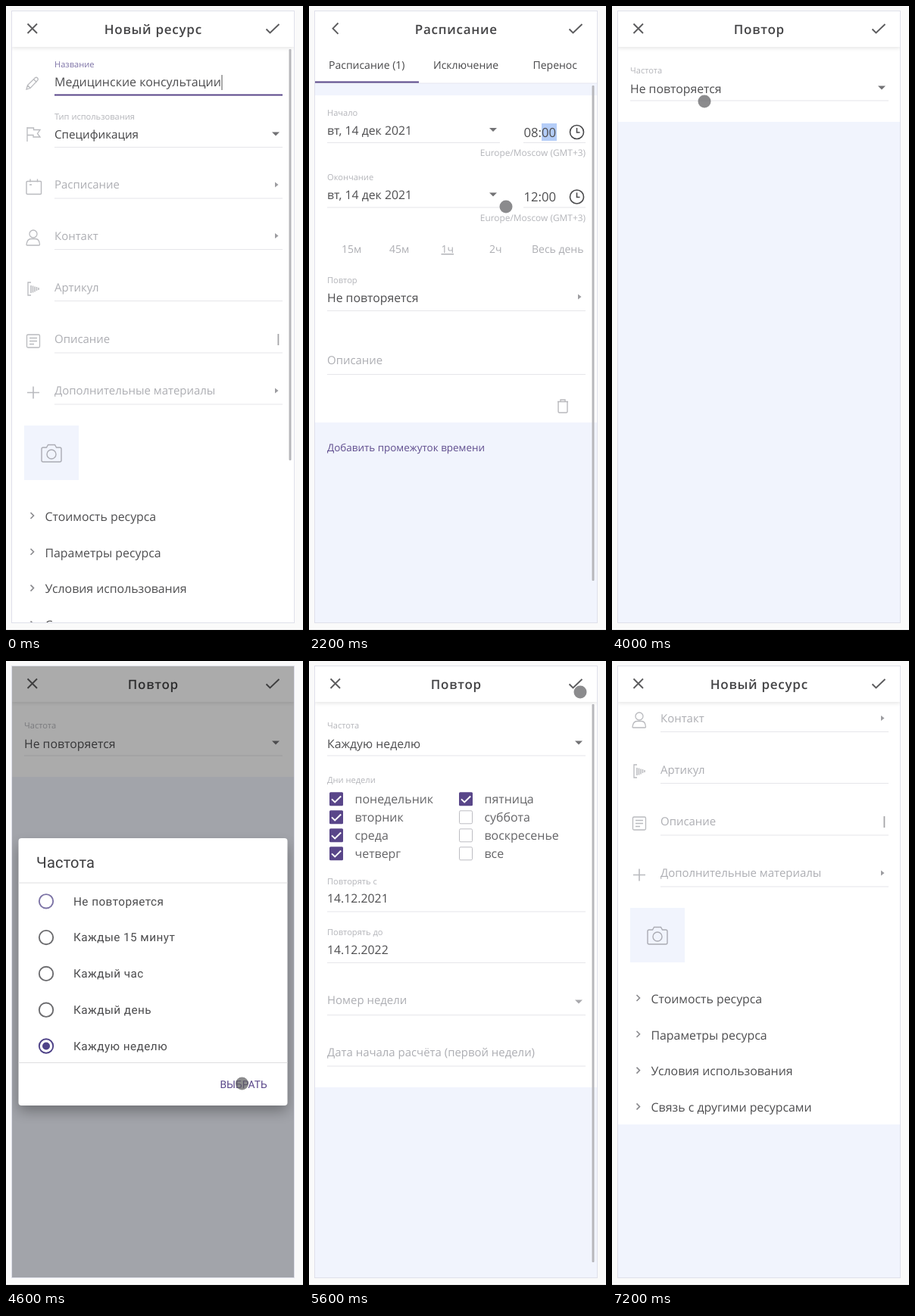
Write an HTML page that moves like this. It is 392 by 828 pixels and loops after 8.1 s.

```html
<!DOCTYPE html>
<html lang="ru">
<head>
<meta charset="utf-8">
<title>Новый ресурс</title>
<style>
html, body { margin: 0; width: 100%; height: 100%; overflow: hidden; background: #fafafa; }
svg { display: block; width: 392px; height: 828px; font-family: "Open Sans", "Noto Sans", sans-serif; }
text { white-space: pre; text-rendering: geometricPrecision; }
.roboto { font-family: Roboto, sans-serif; }
</style>
</head>
<body>
<svg id="stage" viewBox="0 0 392 828" xmlns="http://www.w3.org/2000/svg">
  <defs>
    <clipPath id="card"><rect x="7.5" y="6.5" width="373" height="807.5"/></clipPath>
    <filter id="soft" x="-20%" y="-60%" width="140%" height="220%"><feGaussianBlur stdDeviation="3"/></filter>
    <filter id="deep" x="-20%" y="-20%" width="140%" height="140%"><feGaussianBlur stdDeviation="9"/></filter>
  </defs>
  <g id="scene" clip-path="url(#card)"></g>
  <rect x="7.5" y="6.5" width="373" height="808" fill="none" stroke="#dfe0ea"/>
  <rect y="824" width="392" height="4" fill="#000"/>
  <circle id="pointer" r="8.5" fill="#5a5a5c" fill-opacity=".7"/>
</svg>
<script>
const LOOP = 8100, STEP = 100;
const DARK = '#4e4e50', PALE = '#adaeb3', LABEL = '#b4b5ba', PURPLE = '#594689', BLUE = '#f1f4fd', ICON = '#b9babe';
const scene = document.getElementById('scene');
const pointer = document.getElementById('pointer');

const text = (x, y, s, size, fill, extra = '') =>
  `<text x="${x}" y="${y}" font-size="${size}" fill="${fill}" ${extra}>${s}</text>`;
const rect = (x, y, w, h, fill, extra = '') =>
  `<rect x="${x}" y="${y}" width="${w}" height="${h}" fill="${fill}" ${extra}/>`;
const path = (d, stroke, width = 1.3, extra = '') =>
  `<path d="${d}" fill="none" stroke="${stroke}" stroke-width="${width}" ${extra}/>`;
const ring = (x, y, r, stroke, width) =>
  `<circle cx="${x}" cy="${y}" r="${r}" fill="none" stroke="${stroke}" stroke-width="${width}"/>`;
const at = (x, y, body) => `<g transform="translate(${x} ${y})">${body}</g>`;
const rule = (x, y, end = 365) => rect(x, y, end - x, 1, '#e6e6ea');
const down = (x, y, fill = '#727275') => `<path d="M${x - 5} ${y - 2.5}h10l-5 5z" fill="${fill}"/>`;
const right = y => `<path d="M355 ${y - 3.5}l4.500 3.500-4.500 3.500z" fill="#9c9ca0"/>`;
const label = (x, y, s, fill = LABEL) => text(x, y, s, 11.1, fill);
const value = (x, y, s) => text(x, y, s, 15.8, DARK);
const hint = (x, y, s) => text(x, y, s, 14.95, PALE);
const scrollbar = (from, to) => rect(373.5, from, 3, to - from, '#b7b7bb', 'rx="1"');

const icons = {
  pencil: path('M-8 8l1.5-5.5L3.5-7.2q1.5-1.2 3 .2t.2 3.2L-3 6.5zM1.5-5.2l4 4M-6.5 2.8l3.3 3.5', ICON),
  flag: path('M-8-9V10M-8-8H.5v2.500H9L5.500-.5 9 4H0V1.500h-8', ICON),
  calendar: path('M-7.5-7h17q1 0 1 1V9q0 1-1 1h-17q-1.500 0-1.500-1V-6q0-1 1.500-1zM-4-10v4M5.500-10v4M-5-2.500h3', ICON, 1.4),
  person: ring(0, -5, 5, ICON, 1.3) + path('M-8 10q-1 0-1-1Q-8 1.500-3 1.500H3Q8 1.500 8.500 9q0 1-1 1z', ICON),
  code: path('M-3-9h-4V8h4', ICON) + path('M-3-5V5M-.5-4.500v9M2-3.500v7M4.500-3v5M7-2v3', ICON, 1.5),
  note: `<rect x="-8.500" y="-8.500" width="17" height="17" rx="1.500" fill="none" stroke="${ICON}" stroke-width="1.300"/>` +
    path('M-5-4H5M-5 0H5M-5 4H1', ICON),
  plus: path('M-8 0H8M0-8V8', ICON, 1.6),
  camera: path('M-11-8h4.500l2-3.500h9l2 3.500H11q2 0 2 2V9q0 2-2 2h-22q-2 0-2-2V-6q0-2 2-2z', '#abacb4', 1.4) +
    ring(0, 1, 6, '#abacb4', 1.4),
  clock: ring(0, 0, 9, '#4a4a4c', 1.6) + path('M0-5.500V.5h4', '#4a4a4c', 1.6),
  trash: path('M-7-6H7M-3-6v-2.500h6V-6M-6-6V7q0 1.500 1.500 1.500h9Q6 8.500 6 7V-6', '#b9b9bd', 1.4)
};

function header(title, back) {
  const left = back ? 'M38.500 22.500l-7 7.200 7 7.200' : 'M28.500 23.500l12.500 12.500M41 23.500L28.500 36';
  return rect(7, 44, 374, 11, '#000', 'opacity=".13" filter="url(#soft)"') +
    rect(7, 6, 374, 48, '#fff') +
    path(left, '#5c5c5e', 1.9) +
    path('M343.500 30.500l5 5 12-11.500', '#5c5c5e', 1.9) +
    text(194.3, 36.5, title, 17, '#444446', 'font-weight="600" letter-spacing=".75" text-anchor="middle"');
}

function form(scroll, focused, bar) {
  const rows = [
    ['calendar', 236, 'Расписание'], ['person', 303.5, 'Контакт'], ['code', 371.5, 'Артикул'],
    ['note', 440, 'Описание'], ['plus', 508, 'Дополнительные материалы']
  ];
  const sections = ['Стоимость ресурса', 'Параметры ресурса', 'Условия использования', 'Связь с другими ресурсами'];
  let s = rect(7, 54, 374, 786, '#fff');
  s += at(35, 102, icons.pencil) + label(64, 80.5, 'Название', focused ? '#7d72a6' : LABEL) +
    text(64, 106.3, 'Медицинские консультации', 16, DARK);
  s += focused ? rect(284.5, 91, 1, 20, '#555') + rect(64, 116.5, 301, 2, PURPLE) : rule(64, 117);
  s += at(36, 169, icons.flag) + label(64, 149.5, 'Тип использования') +
    text(64, 174.5, 'Спецификация', 15.2, '#434345') + down(356, 169) + rule(64, 186);
  rows.forEach(([icon, y, name]) => {
    s += at(36, y + 2.5, icons[icon]) + hint(64, y + 5.2, name) + rule(64, y + 17.5);
    if (icon === 'note') s += rect(358.5, y - 7, 1.8, 15, '#a5a5a9');
    else if (icon !== 'code') s += right(y);
  });
  s += rect(24, 554, 72, 72, BLUE) + at(60, 591, icons.camera);
  sections.forEach((name, i) => {
    const y = 674 + i * 47.8;
    s += path(`M32.500 ${y - 5}l4 4-4 4`, '#8a8a8e', 1.6) + text(51.5, y + 5.7, name, 15.85, DARK);
  });
  return rect(7, 54, 374, 760, BLUE) + at(0, -scroll, s) + header('Новый ресурс', false) +
    (bar ? scrollbar(57 + scroll * .9, Math.min(812, 600 + scroll * .9)) : '');
}

function timeBlock(y, name, time, picked) {
  const mark = picked ? rect(picked === 1 ? 284 : 307, y + 15, 20, 23, '#b4cdf8') : '';
  return label(24, y + 4.5, name) + value(24, y + 29.8, 'вт, 14 дек 2021') + down(243, y + 23.5) +
    rule(24, y + 40, 252) + mark + text(283.5, y + 32.5, time, 16.7, DARK) +
    rule(283, y + 40) + at(353.5, y + 26.5, icons.clock) +
    text(365, y + 58, 'Europe/Moscow (GMT+3)', 11.9, LABEL, 'text-anchor="end"');
}

function schedule(start, end, pick1, pick2, repeat) {
  const tabs = [[26, 'Расписание (1)'], [164, 'Исключение'], [295.5, 'Перенос']];
  const spans = [[43, '15м'], [106, '45м'], [174.5, '1ч'], [238, '2ч'], [294, 'Весь день']];
  return rect(7, 54, 374, 760, BLUE) + rect(7, 118, 374, 432, '#fff') + header('Расписание', true) +
    rect(7, 54, 374, 48, '#fff') + rect(7, 101.5, 374, 1, '#e6e7ef') +
    tabs.map(([x, s]) => text(x, 82.5, s, 14, '#48484a')).join('') +
    rect(7.5, 99.5, 137.5, 2, PURPLE) +
    timeBlock(140, 'Начало', start, pick1) + timeBlock(225.5, 'Окончание', end, pick2) +
    spans.map(([x, s]) => text(x, 326, s, 14, PALE, s === '1ч' ? 'text-decoration="underline"' : '')).join('') +
    label(24, 366, 'Повтор') + value(24, 391, repeat) + right(384) + rule(24, 402) +
    hint(24, 472.5, 'Описание') + rule(24, 486) + at(335, 528.5, icons.trash) +
    text(24, 588, 'Добавить промежуток времени', 13.45, '#5f4d8e', 'font-weight="500"') +
    scrollbar(105, 759);
}

function checkbox(x, y, name, on) {
  const box = on
    ? rect(x - 9, y - 9, 18, 18, PURPLE, 'rx="1.500"') + path(`M${x - 6} ${y}l4.200 4.200 8-8`, '#fff', 1.9)
    : `<rect x="${x - 8.5}" y="${y - 8.5}" width="17" height="17" rx="1.500" fill="#fff" stroke="#bdbdc2"/>`;
  return box + text(x + 24.5, y + 5.7, name, 15.95, '#656568');
}

function repeatPage(weekly, checked) {
  const days = ['понедельник', 'вторник', 'среда', 'четверг', 'пятница', 'суббота', 'воскресенье', 'все'];
  let s = rect(7, 54, 374, 760, BLUE) + rect(7, 54, 374, weekly ? 509 : 99, '#fff') + header('Повтор', false) +
    label(24, 89, 'Частота') + value(24, 114.5, weekly ? 'Каждую неделю' : 'Не повторяется') +
    down(356, 108) + rule(24, 124.5);
  if (!weekly) return s;
  s += label(24, 160.5, 'Дни недели');
  days.forEach((day, i) => s += checkbox(i < 4 ? 36 : 207, 182.3 + (i % 4) * 24, day, i < checked));
  return s + label(24, 294.5, 'Повторять с') + value(24, 319.3, '14.12.2021') + rule(24, 330.5) +
    label(24, 362, 'Повторять до') + value(24, 386.8, '14.12.2022') + rule(24, 398) +
    hint(24, 453, 'Номер недели') + down(356, 450, '#a9a9ad') + rule(24, 467) +
    hint(24, 521.5, 'Дата начала расчёта (первой недели)') + rule(24, 534.5) + scrollbar(57, 794);
}

function dialog(chosen, alpha) {
  const options = ['Не повторяется', 'Каждые 15 минут', 'Каждый час', 'Каждый день', 'Каждую неделю'];
  let s = rect(17, 244, 354, 350, '#000', 'opacity=".32" filter="url(#deep)"') +
    rect(16.5, 234, 355, 353, '#fff', 'rx="4"') +
    text(40, 273, 'Частота', 20, '#3c3c3e', 'letter-spacing=".2"') +
    rect(16.5, 292.5, 355, 1, '#dedee0') + rect(16.5, 530, 355, 1, '#dedee0');
  options.forEach((name, i) => {
    const y = 317.3 + i * 47.8, on = i === chosen;
    s += ring(53, y, 9.2, on ? '#4f4388' : i ? '#6b6b6e' : '#7d74a6', 1.9) +
      (on ? `<circle cx="53" cy="${y}" r="5" fill="#4f4388"/>` : '') +
      text(89, y + 5.2, name, 15.3, '#4c4c4e', 'letter-spacing=".45"');
  });
  s += text(282.5, 563.5, 'ВЫБРАТЬ', 13.8, PURPLE);
  return `<g class="roboto" opacity="${alpha}">${rect(7, 6, 374, 808, '#000', 'opacity=".33"')}${s}</g>`;
}

function page(t) {
  if (t < 700) return form(0, true, true);
  if (t < 3500) {
    const start = t < 1600 ? '11:00' : '08:00';
    const end = t < 2500 ? '12:00' : '18:00';
    const pick1 = t < 1400 || t >= 2300 ? 0 : t < 1600 ? 1 : 2;
    const pick2 = t < 2300 || t >= 3100 ? 0 : t < 2500 ? 1 : 2;
    return schedule(start, end, pick1, pick2, 'Не повторяется');
  }
  if (t < 4800) {
    const open = t >= 4100 ? dialog(t < 4400 ? 0 : 4, t < 4200 || t >= 4700 ? .5 : 1) : '';
    return repeatPage(false, 0) + open;
  }
  if (t < 5700) return repeatPage(true, Math.max(0, Math.min(5, (t - 4800) / 100)));
  if (t < 6000) return schedule('08:00', '18:00', 0, 0, 'Каждую неделю');
  const p = Math.max(0, Math.min(1, (t - 6100) / 500));
  return form(228 * p * p * (3 - 2 * p), false, t < 6600);
}

// time, x, y
const route = [
  [100, 190, 330], [500, 72, 237], [700, 72, 237], [1000, 79, 160], [1400, 293, 168], [1600, 293, 168],
  [1800, 260, 265], [2200, 260, 265], [2300, 293, 254], [2600, 293, 254], [3000, 215, 330], [3300, 122, 386],
  [3600, 122, 386], [4000, 122, 126], [4100, 122, 126], [4400, 130, 508], [4600, 311.5, 558], [4700, 311.5, 558],
  [4900, 36, 182], [5200, 36, 254], [5300, 207, 182], [5600, 358, 41], [6000, 358, 41]
];

function movePointer(t) {
  const i = route.findIndex(k => k[0] > t);
  pointer.style.display = i > 0 ? '' : 'none';
  if (i < 1) return;
  const [t0, x0, y0] = route[i - 1], [t1, x1, y1] = route[i];
  const p = (t - t0) / (t1 - t0);
  pointer.setAttribute('cx', x0 + (x1 - x0) * p);
  pointer.setAttribute('cy', y0 + (y1 - y0) * p);
}

let shown = -1;
const began = performance.now();

function draw(now) {
  const t = Math.floor(Math.max(0, now - began) % LOOP / STEP) * STEP;
  if (t !== shown) {
    scene.innerHTML = page(t);
    movePointer(t);
    shown = t;
  }
  requestAnimationFrame(draw);
}
draw(began);
</script>
</body>
</html>
```
